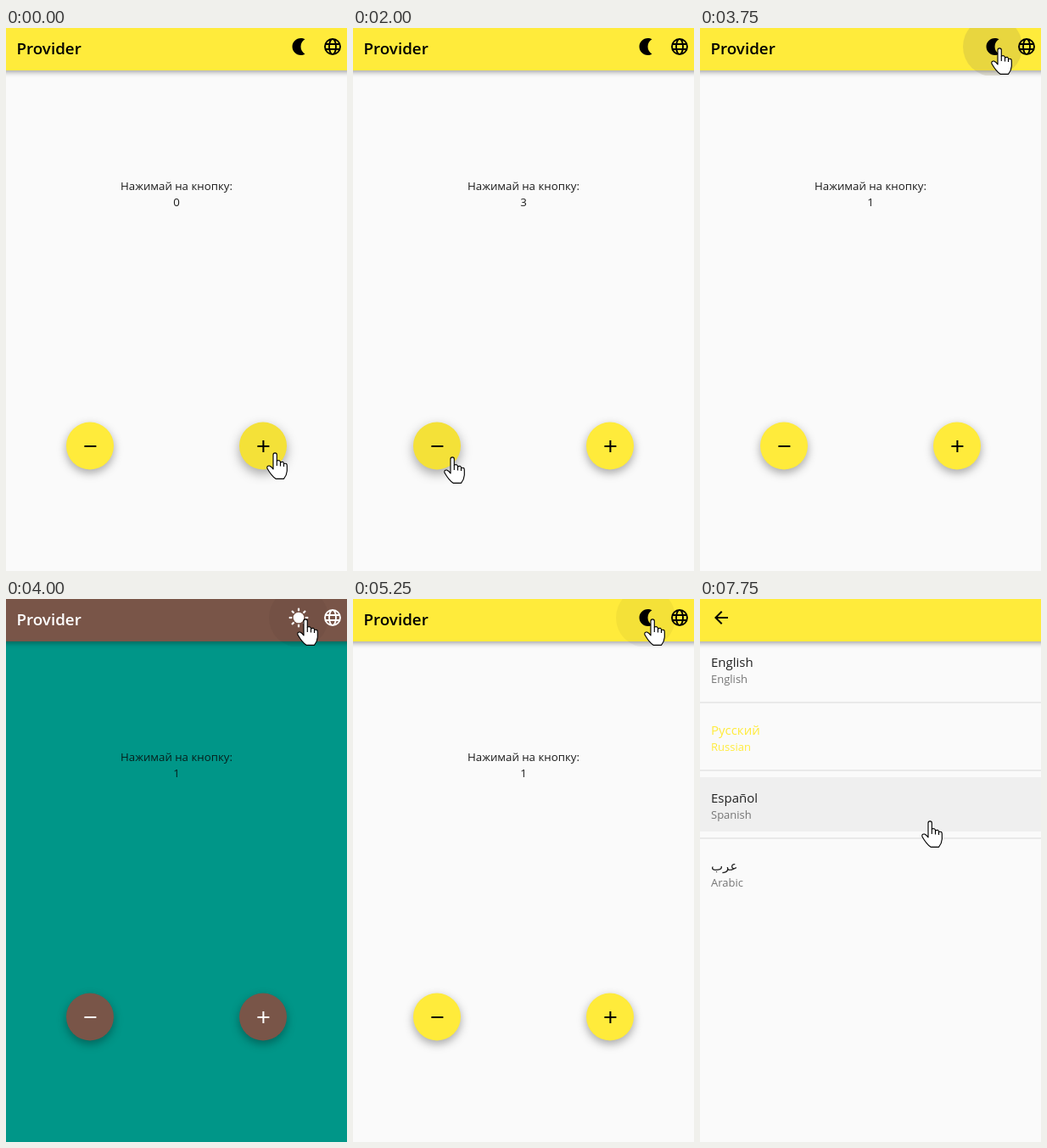
These frames come from a looping animation (402x640 px, 8 s). An HTML page with a canvas:

```html
<!DOCTYPE html>
<html lang="ru">
<head>
<meta charset="utf-8">
<title>Provider</title>
<style>
  html, body { margin: 0; width: 100%; height: 100%; overflow: hidden; background: #fafafa; }
  canvas { display: block; }
</style>
</head>
<body>
<canvas id="stage" width="402" height="640"></canvas>
<script>
const W = 402, H = 640, LOOP = 8000;
const ctx = document.getElementById('stage').getContext('2d');
const FONT = '"Open Sans", "Noto Sans", "DejaVu Sans", sans-serif';

const LIGHT = { bar: '#ffeb3b', body: '#fafafa', ink: '#000', splash: 'rgba(140,130,80,.2)' };
const DARK = { bar: '#795548', body: '#009688', ink: '#fff', splash: 'rgba(204,204,204,.13)' };
const HOVER = 'rgba(0,0,0,.045)';

const MOON = new Path2D('M14.5 2c1.82 0 3.53.5 5 1.35-2.99 1.73-5 4.95-5 8.65s2.01 6.92 5 8.65C18.03 21.5 16.32 22 14.5 22 8.98 22 4.5 17.52 4.5 12S8.98 2 14.5 2z');
const BACK = new Path2D('M20 11H7.83l5.59-5.59L12 4l-8 8 8 8 1.41-1.41L7.83 13H20z');
const HAND = new Path2D('M8 20V3Q8 .8 10.1 .8Q12.3 .8 12.3 3V10Q16.5 8.8 16.5 12Q20.5 10.3 20.5 13.5Q24.3 12.4 24.3 16V22Q24 27 20.5 31.3H11Q6 28 .9 19Q.2 15.6 3.6 16Q6 17 8 20Z');
const KNUCKLES = new Path2D('M12.3 10V16M16.5 12V16.5M20.5 13.5V17');
const ARROW = new Path2D('M1 1V24L6.3 19L10 27.2L13.7 25.6L10.2 17.6H17.3Z');

// Each step overrides part of the state and holds until the next one.
const STEPS = [
  { at: 0, count: 0, cursor: [307, 500], plus: 'hover' },
  { at: 250, plus: 'press' },
  { at: 750, count: 1, plus: 'hover' },
  { at: 1000, plus: 'press' },
  { at: 1500, count: 2 },
  { at: 1750, count: 3, plus: 'hover' },
  { at: 2000, plus: '', minus: 'hover', cursor: [107, 505] },
  { at: 2250, count: 2, minus: 'press' },
  { at: 2500, count: 1 },
  { at: 2750, minus: 'hover', cursor: [207, 147], pointer: 'arrow' },
  { at: 3000, minus: '', cursor: [342, 30], pointer: 'hand' },
  { at: 3250, cursor: [338, 30], mode: 'hover' },
  { at: 3500, cursor: [344, 16] },
  { at: 3750, cursor: [343, 23], mode: 'press' },
  { at: 4000, theme: DARK, icon: 'sun', mode: 'hover' },
  { at: 5000, icon: 'moon', mode: 'press' },
  { at: 5250, theme: LIGHT, mode: 'hover' },
  { at: 6250, mode: '', globe: 'hover', cursor: [386, 21] },
  { at: 6500, cursor: [386, 17] },
  { at: 7000, cursor: [386, 20], globe: 'press' },
  { at: 7250, listScale: 0.99 },
  { at: 7500, listScale: 1, row: true, cursor: [232, 261] },
  { at: 7750, cursor: [261, 261] }
];
const START = { theme: LIGHT, icon: 'moon', pointer: 'hand', plus: '', minus: '', mode: '', globe: '', listScale: 0, row: false };

function stateAt(t) {
  return Object.assign({}, START, ...STEPS.filter(step => step.at <= t));
}

function text(str, x, y, size, color, weight = 400, align = 'left') {
  ctx.font = `${weight} ${size}px ${FONT}`;
  ctx.textAlign = align;
  ctx.fillStyle = color;
  ctx.fillText(str, x, y);
}

function disc(x, y, r, color) {
  ctx.fillStyle = color;
  ctx.beginPath();
  ctx.arc(x, y, r, 0, Math.PI * 2);
  ctx.fill();
}

function shadow(dy, blur, alpha) {
  ctx.shadowColor = `rgba(0,0,0,${alpha})`;
  ctx.shadowBlur = blur;
  ctx.shadowOffsetY = dy;
}

function at(x, y, draw) {
  ctx.save();
  ctx.translate(x, y);
  draw();
  ctx.restore();
}

function appBar(color) {
  at(0, 0, () => {
    shadow(2, 6, 0.36);
    ctx.fillStyle = color;
    ctx.fillRect(-10, -10, W + 20, 60);
  });
}

function button(x, theme, mode, isPlus) {
  const y = 492.5, r = 28;
  at(0, 0, () => {
    if (mode === 'press') shadow(7, 16, 0.34);
    else shadow(mode ? 5 : 4, mode ? 13 : 11, 0.34);
    disc(x, y, r, theme.bar);
  });
  if (mode) disc(x, y, r, HOVER);
  if (mode === 'press') disc(x, y, r, 'rgba(188,188,188,.2)');
  const iconX = x + 0.4;
  ctx.fillStyle = theme.ink;
  ctx.fillRect(iconX - 7, 492, 14, 2);
  if (isPlus) ctx.fillRect(iconX - 1, 486, 2, 14);
}

function halo(x, mode, theme) {
  if (mode) disc(x, 22, 35, mode === 'press' ? theme.splash : HOVER);
}

function sun(color) {
  disc(0, 0, 6.3, color);
  ctx.strokeStyle = color;
  ctx.lineWidth = 2.2;
  for (let i = 0; i < 8; i++) {
    ctx.rotate(Math.PI / 4);
    ctx.beginPath();
    ctx.moveTo(7.8, 0);
    ctx.lineTo(11.3, 0);
    ctx.stroke();
  }
}

function globe(color) {
  ctx.strokeStyle = color;
  ctx.lineWidth = 1.9;
  ctx.beginPath();
  ctx.arc(0, 0, 9, 0, Math.PI * 2);
  ctx.moveTo(4, 0);
  ctx.ellipse(0, 0, 4, 9, 0, 0, Math.PI * 2);
  for (const y of [-3, 3]) {
    ctx.moveTo(-8.5, y);
    ctx.lineTo(8.5, y);
  }
  ctx.stroke();
}

function counterPage(s) {
  const { theme } = s;
  ctx.fillStyle = theme.body;
  ctx.fillRect(0, 0, W, H);
  appBar(theme.bar);
  at(0, 0, () => {
    ctx.beginPath();
    ctx.rect(0, 0, W, 56);
    ctx.clip();
    halo(345, s.mode, theme);
    halo(385, s.globe, theme);
  });
  text('Provider', 12.5, 31, 18.8, theme.ink, 600);
  if (s.icon === 'sun') at(345, 22, () => sun(theme.ink));
  else at(333, 10, () => {
    ctx.fillStyle = theme.ink;
    ctx.fill(MOON);
  });
  at(385, 22, () => globe(theme.ink));
  const ink = theme === DARK ? '#06201d' : '#1c1c1c';
  text('Нажимай на кнопку:', 201, 191, 13.25, ink, 400, 'center');
  text(s.count, 201, 210, 13.25, ink, 400, 'center');
  button(99, theme, s.minus, false);
  button(303, theme, s.plus, true);
}

const LANGUAGES = [['English', 'English'], ['Русский', 'Russian'], ['Español', 'Spanish'], ['عرب', 'Arabic']];

function listPage(s) {
  ctx.fillStyle = LIGHT.body;
  ctx.fillRect(0, 0, W, H);
  if (s.row) {
    ctx.fillStyle = '#efefef';
    ctx.fillRect(0, 210, W, 64);
  }
  LANGUAGES.forEach(([name, english], i) => {
    const y = i * 80, chosen = i === 1;
    text(name, 13, 80 + y, 15, chosen ? LIGHT.bar : '#212121');
    text(english, 13, 99 + y, 13, chosen ? LIGHT.bar : '#757575');
    if (i < 3) {
      ctx.fillStyle = '#e9e9e9';
      ctx.fillRect(0, 121 + y, W, 2);
    }
  });
  appBar(LIGHT.bar);
  at(13, 10, () => {
    ctx.fillStyle = '#000';
    ctx.fill(BACK);
  });
}

function cursor(s) {
  at(...s.cursor, () => {
    const hand = s.pointer === 'hand', shape = hand ? HAND : ARROW;
    ctx.lineWidth = 1.15;
    ctx.lineJoin = 'round';
    ctx.fillStyle = '#fff';
    ctx.strokeStyle = '#000';
    ctx.fill(shape);
    ctx.stroke(shape);
    if (hand) ctx.stroke(KNUCKLES);
  });
}

function render(now) {
  const s = stateAt(now % LOOP);
  if (s.listScale < 1) counterPage(s);
  if (s.listScale) at(W / 2, H / 2, () => {
    ctx.scale(s.listScale, s.listScale);
    ctx.translate(-W / 2, -H / 2);
    ctx.beginPath();
    ctx.rect(0, 0, W, H);
    ctx.clip();
    listPage(s);
  });
  cursor(s);
}

const began = performance.now();
function frame() {
  render(performance.now() - began);
  requestAnimationFrame(frame);
}
frame();
</script>
</body>
</html>
```
